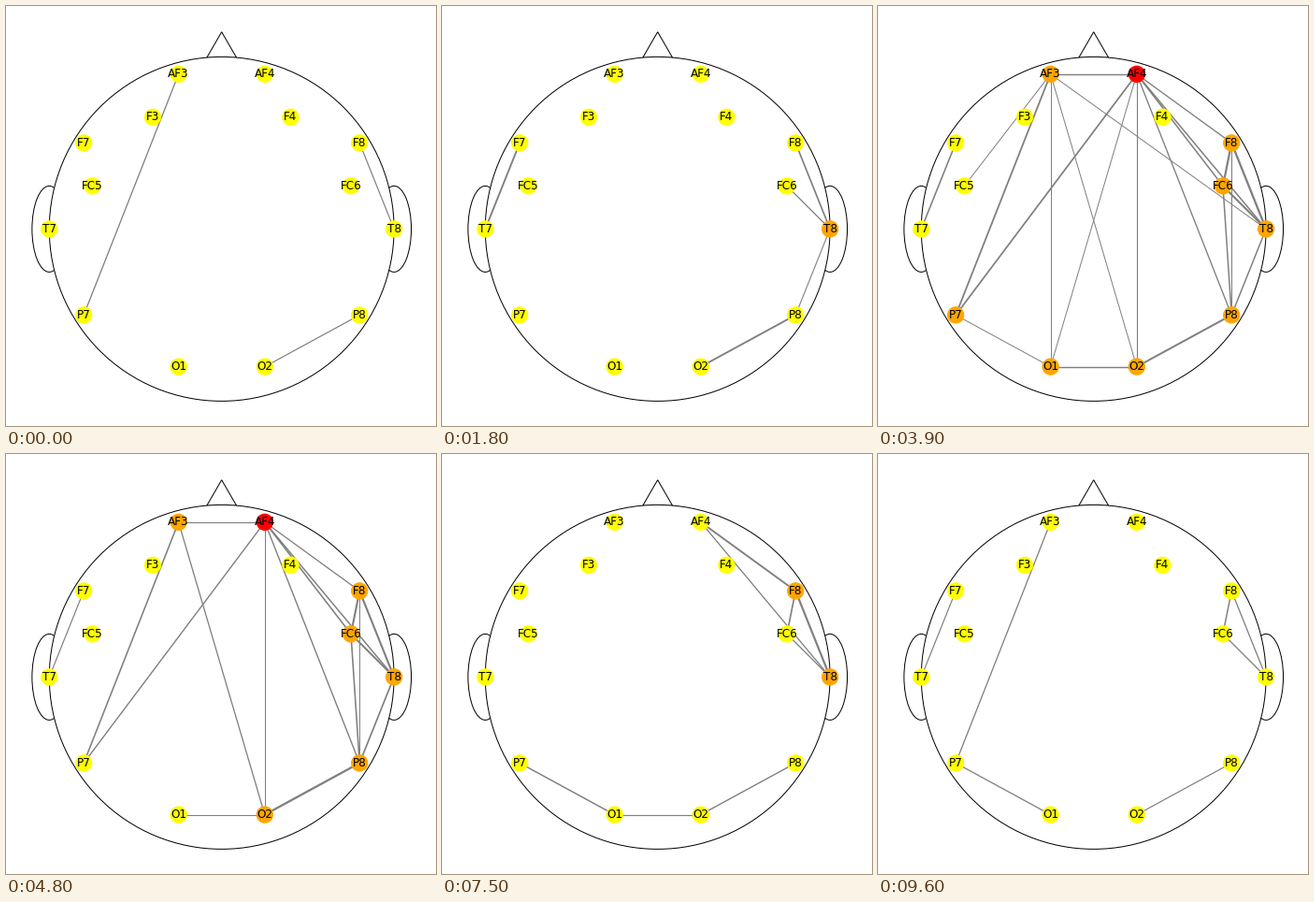
Recreate the animation shown at these times as a matplotlib script. Size 460 by 449 pixels, loop 9.9 s.

```python
import matplotlib.pyplot as plt
import numpy as np
from matplotlib.animation import FuncAnimation
from matplotlib.collections import LineCollection
from matplotlib.patches import Ellipse, Polygon

W, H, DPI = 460, 449, 72
FRAMES, STEP_MS = 33, 300
CX, CY, RX, RY = 230.7, 238.4, 184.4, 184.0

# Left electrode, right electrode, offset from the head centre in radii
PAIRS = [
    ("AF3", "AF4", 0.25, 0.9), ("F3", "F4", 0.4, 0.65),
    ("F7", "F8", 0.8, 0.5), ("FC5", "FC6", 0.75, 0.25),
    ("T7", "T8", 1.0, 0.0), ("P7", "P8", 0.8, -0.5),
    ("O1", "O2", 0.25, -0.8),
]

# Link widths at a few moments, in steps; other moments are interpolated
POSES = {
    0: {"AF3-P7": 1.3, "F8-T8": 1.2, "O2-P8": 1.2},
    6: {"F7-T7": 1.9, "F8-T8": 1.7, "FC6-T8": 1.3, "P8-T8": 1.1,
        "O2-P8": 1.9},
    10: {"AF3-AF4": 1.7, "AF3-FC5": 1.2, "AF3-P7": 2.0, "AF3-O1": 1.3,
         "AF3-T8": 1.3, "AF4-P7": 2.1, "AF4-O1": 1.9, "AF4-O2": 1.3,
         "AF4-P8": 1.3, "AF4-F8": 1.4, "AF4-FC6": 1.5, "AF4-T8": 1.6,
         "F8-FC6": 2.3, "F8-T8": 2.5, "F8-P8": 1.2, "FC6-T8": 2.2,
         "FC6-P8": 1.4, "P8-T8": 1.3, "O2-P8": 1.7, "O1-O2": 1.8,
         "P7-O1": 1.8, "F7-T7": 2.0},
    16: {"AF3-AF4": 1.2, "AF3-P7": 1.6, "AF3-O2": 1.3, "AF4-P7": 1.4,
         "AF4-O2": 1.0, "AF4-P8": 1.4, "AF4-F8": 1.3, "AF4-FC6": 1.6,
         "AF4-T8": 1.5, "F8-FC6": 2.1, "F8-T8": 2.1, "F8-P8": 1.0,
         "FC6-T8": 2.0, "FC6-P8": 1.6, "P8-T8": 1.7, "O2-P8": 2.3,
         "O1-O2": 1.1, "F7-T7": 1.2},
    21: {"AF3-AF4": 1.4, "AF3-P7": 1.9, "AF3-O1": 1.1, "AF3-O2": 1.3,
         "AF3-P8": 1.3, "AF4-P7": 1.4, "AF4-O2": 1.2, "AF4-F8": 2.0,
         "AF4-FC6": 1.6, "AF4-T8": 1.4, "F8-FC6": 1.8, "F8-T8": 1.9,
         "F8-P8": 1.2, "P8-T8": 1.5, "O2-P8": 1.7, "O1-O2": 1.4,
         "P7-O1": 1.6, "F7-T7": 1.4},
    25: {"AF4-F8": 1.9, "AF4-T8": 1.3, "F8-FC6": 1.7, "F8-T8": 2.2,
         "FC6-T8": 1.3, "P7-O1": 1.5, "O1-O2": 1.2, "O2-P8": 1.4},
    32: {"AF3-P7": 1.3, "F7-T7": 1.2, "F8-FC6": 1.5, "F8-T8": 1.3,
         "FC6-T8": 1.3, "P7-O1": 1.3, "O2-P8": 1.2},
}


def place(x, y):
    return CX + x * RX, CY - y * RY


def widths_at(i):
    """Visible links and their widths at step i."""
    times = list(POSES)
    found = {}
    for link in LINKS:
        w = np.interp(i, times, [p.get(link, 0) for p in POSES.values()])
        if w >= 0.6:
            found[link] = max(w, 1.0)
    return found


def node_color(degree):
    return "red" if degree >= 7 else "orange" if degree >= 3 else "yellow"


LINKS = sorted({link for pose in POSES.values() for link in pose})
SITES = {}
for left, right, x, y in PAIRS:
    SITES[left] = place(-x, y)
    SITES[right] = place(x, y)

fig = plt.figure(figsize=(W / DPI, H / DPI), dpi=DPI, facecolor="white")
ax = fig.add_axes([0, 0, 1, 1])
ax.set(xlim=(0, W), ylim=(H, 0))
ax.axis("off")

# Head: the white disc hides the inner part of ears and nose
outline = dict(facecolor="white", edgecolor="black", linewidth=1)
for side in (-1, 1):
    ax.add_patch(Ellipse(place(side, 0), 0.2 * RX, 0.5 * RY, zorder=0, **outline))
nose = [place(0, 1.145), place(-0.0866, 0.995), place(0.0866, 0.995)]
ax.add_patch(Polygon(nose, zorder=0, **outline))
ax.add_patch(Ellipse((CX, CY), 2 * RX, 2 * RY, zorder=0.5, **outline))

lines = LineCollection([], colors="gray", zorder=1)
ax.add_collection(lines, autolim=False)
nodes = ax.scatter(*zip(*SITES.values()), s=300, c="yellow", linewidths=1, zorder=2)
for name, (x, y) in SITES.items():
    ax.text(x, y, name, fontsize=12, family="DejaVu Sans",
            ha="center", va="center", zorder=3)


def draw(i):
    links = widths_at(i)
    ends = [link.split("-") for link in links]
    lines.set_segments([[SITES[a], SITES[b]] for a, b in ends])
    lines.set_linewidths(list(links.values()) or [1])
    colors = [node_color(sum(name in pair for pair in ends)) for name in SITES]
    nodes.set_facecolor(colors)
    nodes.set_edgecolor(colors)
    return lines, nodes


anim = FuncAnimation(fig, draw, frames=FRAMES, interval=STEP_MS,
                     repeat=True, repeat_delay=0, blit=False)
plt.show()
```
